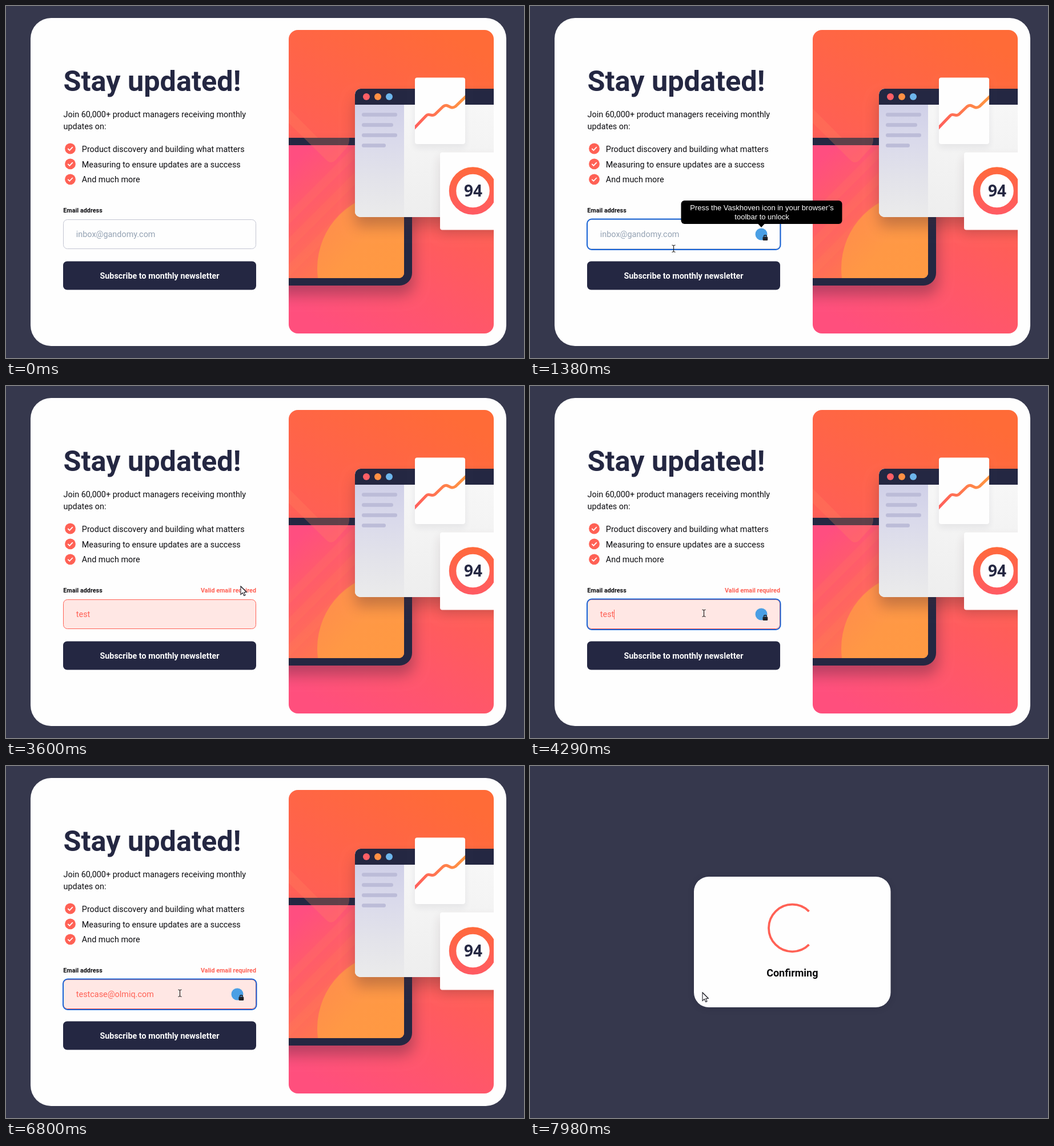
These frames come from a looping animation (907 px wide and 617 px high, 8000 ms). An HTML page with a canvas:

```html
<!DOCTYPE html>
<html lang="en">
<head>
<meta charset="utf-8">
<title>Stay updated</title>
<style>
html, body { margin: 0; width: 100%; height: 100%; overflow: hidden; background: #36384d; }
canvas { display: block; }
</style>
</head>
<body>
<canvas id="stage" width="907" height="617"></canvas>
<script>
const W = 907, H = 617, LOOP = 8000;
const NAVY = '#242742', TOMATO = '#ff6155', SLATE = '#36384d', WHITE = '#fefefe';
const ROBOTO = 'Roboto, sans-serif';
const stage = document.getElementById('stage').getContext('2d');
let g = stage;

// ---- drawing helpers ----
function box(x, y, w, h, r, fill, stroke, lw = 1) {
  g.beginPath();
  g.roundRect(x, y, w, h, r);
  if (fill) { g.fillStyle = fill; g.fill(); }
  if (stroke) { g.strokeStyle = stroke; g.lineWidth = lw; g.stroke(); }
}

function disc(x, y, r, fill) {
  g.beginPath();
  g.arc(x, y, r, 0, Math.PI * 2);
  g.fillStyle = fill;
  g.fill();
}

function text(str, x, y, font, color, align = 'left') {
  g.font = font;
  g.fillStyle = color;
  g.textAlign = align;
  g.fillText(str, x, y);
}

function poly(points, fill, stroke, lw = 1) {
  g.beginPath();
  points.forEach(([x, y]) => g.lineTo(x, y));
  if (fill) { g.closePath(); g.fillStyle = fill; g.fill(); }
  if (stroke) { g.strokeStyle = stroke; g.lineWidth = lw; g.stroke(); }
}

function gradient(x0, y0, x1, y1, ...colors) {
  const grad = g.createLinearGradient(x0, y0, x1, y1);
  colors.forEach((c, i) => grad.addColorStop(i / (colors.length - 1), c));
  return grad;
}

function shadowed(color, blur, dx, dy, draw) {
  g.save();
  g.shadowColor = color;
  g.shadowBlur = blur;
  g.shadowOffsetX = dx;
  g.shadowOffsetY = dy;
  draw();
  g.restore();
}

function clipped(x, y, w, h, r, draw) {
  g.save();
  g.beginPath();
  g.roundRect(x, y, w, h, r);
  g.clip();
  draw();
  g.restore();
}

// ---- illustration ----
function tablet() {
  shadowed('rgba(60,30,60,.36)', 24, 4, 17, () => box(440, 231, 271, 259, 22, NAVY));
  clipped(440, 244, 257, 233, 9, () => {
    box(440, 244, 257, 233, 0, gradient(505, 270, 625, 410, '#ff4e80', '#ff6064', '#ff7650'));
    for (let i = 0; i < 3; i++) {
      const x = 612 + i * 46;
      poly([[x, 244], [x + 22, 244], [x - 211, 477], [x - 233, 477]], 'rgba(255,150,80,.1)');
    }
    disc(678, 460, 133, gradient(560, 360, 690, 470, '#ff8d4c', '#ff9845', '#ff9942'));
  });
  g.beginPath();
  g.moveTo(495, 180);
  g.lineTo(546, 231);
  g.lineTo(601, 231);
  g.quadraticCurveTo(602, 242, 595, 250);
  g.lineTo(577, 270);
  g.quadraticCurveTo(569, 278, 561, 270);
  g.lineTo(495, 205);
  g.fillStyle = 'rgba(255,135,95,.27)';
  g.fill();
}

function appWindow() {
  shadowed('rgba(70,40,50,.3)', 24, 0, 17, () => box(611, 145, 300, 225, 10, '#f3f3f3'));
  clipped(611, 145, 300, 225, 10, () => {
    box(611, 145, 300, 225, 0, gradient(0, 173, 0, 370, '#f7f7f7', '#eeeeee'));
    box(611, 173, 86, 197, 0, gradient(0, 173, 0, 370, '#d0d0e8', '#dadaeb', '#e3e3ea', '#ebebeb'));
    box(611, 145, 300, 28, 0, NAVY);
  });
  ['#ff5f66', '#ff9145', '#6db6ec'].forEach((c, i) => disc(631 + i * 20, 159, 6, c));
  [62, 55, 62, 42].forEach((w, i) => box(623, 187.3 + i * 18, w, 6.4, 3.2, '#bcbcd8'));
}

function chartCard() {
  shadowed('rgba(40,40,70,.08)', 12, 0, 6, () => box(716, 125.5, 88, 116.5, 4, WHITE));
  clipped(716, 125.5, 88, 116.5, 4, () => {
    g.beginPath();
    g.moveTo(712, 217);
    g.lineTo(735, 193);
    g.bezierCurveTo(741, 186, 744, 195, 751, 190);
    g.lineTo(765, 176.5);
    g.bezierCurveTo(774, 169, 777, 183, 787, 176);
    g.lineTo(808, 156);
    g.strokeStyle = gradient(716, 0, 804, 0, '#ff5f5c', '#ff9640');
    g.lineWidth = 5;
    g.stroke();
  });
}

function scoreCard() {
  shadowed('rgba(70,40,50,.14)', 18, 0, 9, () => box(760, 256.5, 140, 136, 4, WHITE));
  g.beginPath();
  g.arc(817.5, 324, 35.5, 0, Math.PI * 2);
  g.strokeStyle = gradient(817, 283, 817, 366, '#ff693c', '#ff5a63');
  g.lineWidth = 12.5;
  g.stroke();
  text('94', 818, 333.5, 'bold 28px "Open Sans", sans-serif', NAVY, 'center');
}

function illustration() {
  clipped(495, 42, 359, 532, 16, () => {
    box(495, 42, 359, 532, 0, gradient(810, 70, 540, 550, '#ff6b37', '#ff5f55', '#ff4f7d'));
    tablet();
    appWindow();
    chartCard();
    scoreCard();
  });
}

// ---- form page without the field ----
function page() {
  box(0, 0, W, H, 0, SLATE);
  box(43, 21, 833, 575, 36, WHITE);
  text('Stay updated!', 100.5, 149, `bold 50.4px ${ROBOTO}`, NAVY);
  const body = `14.4px ${ROBOTO}`, ink = '#0c0c10';
  text('Join 60,000+ product managers receiving monthly', 100.5, 194.5, body, ink);
  text('updates on:', 100.5, 216, body, ink);
  ['Product discovery and building what matters',
   'Measuring to ensure updates are a success',
   'And much more'].forEach((line, i) => {
    const y = 250 + i * 26.9;
    disc(112.5, y, 9.4, TOMATO);
    poly([[108.3, y], [111.3, y + 3], [116.8, y - 2.8]], null, WHITE, 1.8);
    text(line, 132.8, y + 5.6, body, ink);
  });
  text('Email address', 100.3, 362, `bold 10.8px ${ROBOTO}`, ink);
  box(100, 447.5, 338, 50, 7, NAVY);
  text('Subscribe to monthly newsletter', 269, 478, `bold 14.4px ${ROBOTO}`, WHITE, 'center');
  illustration();
}

const backdrop = document.createElement('canvas');
backdrop.width = W;
backdrop.height = H;
g = backdrop.getContext('2d');
page();
g = stage;

// ---- timeline ----
const FOCUS = 880, TIP_END = 1740, SUBMIT = 3100, REFOCUS = 4160, CONFIRM = 7250;
const ADDRESS = 'testcase@olmiq.com';
const keys = [];
[[1720, 90, 4], [5040, 50, 4], [5450, 0, 1], [5740, 80, 2], [6070, 38, 7]].forEach(
  ([start, gap, count]) => {
    for (let i = 0; i < count; i++) keys.push(start + i * gap);
  });

// start, end, from, to, bend of the path
const moves = [
  [200, 960, [792, 592], [250, 408], [420, 440]],
  [1040, 1340, [250, 408], [251, 425], [250, 418]],
  [2660, 3060, [251, 425], [241, 464], [250, 448]],
  [3390, 3600, [241, 464], [411, 351], [340, 420]],
  [3850, 4250, [411, 351], [304, 398], [350, 372]]
];

function pointerAt(t) {
  let pos = null;
  for (const [start, end, a, b, c] of moves) {
    if (t < start) break;
    const u = Math.min(1, (t - start) / (end - start));
    const k = u * u * (3 - 2 * u), m = 1 - k;
    pos = a.map((v, i) => m * m * v + 2 * m * k * c[i] + k * k * b[i]);
  }
  return pos;
}

// ---- pointer shapes ----
function arrow() {
  poly([[0, 0], [0, 14.5], [3.4, 11.5], [5.7, 16.6], [8, 15.6], [5.8, 10.7], [10.3, 10.4]],
    '#fff', '#22222a', 1.1);
  poly([[10.3, 10.4], [0, 0]], null, '#22222a', 1.1);
}

function beam() {
  poly([[-3, -6], [0, -5], [3, -6]], null, '#222', 1.1);
  poly([[-3, 6.5], [0, 5.5], [3, 6.5]], null, '#222', 1.1);
  poly([[0, -5], [0, 5.5]], null, '#222', 1.2);
}

function hand() {
  box(-1.5, 0, 3.2, 12, 1.6, '#fff', '#222');
  box(-3.5, 8, 13, 10, 4, '#fff', '#222');
  for (let i = 0; i < 3; i++) box(1.6 + i * 2.7, 5.5 + i * 0.5, 2.7, 6, 1.3, '#fff', '#222', 0.8);
  box(-1, 8, 9.5, 8, 2, '#fff');
}

function pointer(t) {
  const pos = pointerAt(t);
  if (!pos || t < 240) return;
  const [x, y] = pos;
  const inside = (top, bottom) => x > 100 && x < 438 && y > top && y < bottom;
  let shape = arrow;
  if (t < CONFIRM) {
    if (inside(374, 426)) shape = beam;
    else if (inside(447, 498)) shape = hand;
  }
  g.save();
  if (shape === beam) g.translate(Math.round(x) + 0.5, Math.round(y));
  else if (t >= CONFIRM) g.translate(302, 397);
  else g.translate(x, y);
  shape();
  g.restore();
}

// ---- field ----
function lockIcon() {
  disc(405, 400, 10.5, '#4a9fe4');
  box(407.5, 404.5, 8.8, 6.6, 1.4, '#222226');
  g.beginPath();
  g.arc(411.9, 404.2, 2.5, Math.PI, 0);
  g.strokeStyle = '#222226';
  g.lineWidth = 1.5;
  g.stroke();
}

function tooltip() {
  box(264.5, 341, 282, 41, 6, '#000');
  poly([[399, 381.5], [411, 381.5], [405, 388]], '#000');
  const font = '13px "Liberation Sans", Arial, sans-serif';
  text('Press the Vaskhoven icon in your browser’s', 406, 358, font, '#fff', 'center');
  text('toolbar to unlock', 406, 374, font, '#fff', 'center');
}

function field(t) {
  const error = t >= SUBMIT;
  const focused = (t >= FOCUS && t < SUBMIT) || t >= REFOCUS;
  const pressed = keys.filter(k => k <= t);
  const value = ADDRESS.slice(0, pressed.length);
  const font = `14.4px ${ROBOTO}`;
  const ink = error ? TOMATO : NAVY;

  box(100.5, 374.5, 337, 51, 7, error ? '#ffe7e4' : WHITE, error ? TOMATO : '#c3c5d2');
  if (error) text('Valid email required', 438, 362, `bold 10.8px ${ROBOTO}`, TOMATO, 'right');
  if (value) text(value, 122.8, 405.3, font, ink);
  else text('inbox@gandomy.com', 122.8, 405.3, font, '#94a2b3');

  if (!focused) return;
  box(100, 373.5, 338.5, 53.5, 8, null, '#1763d6', 2);
  const since = t - Math.max(t >= REFOCUS ? REFOCUS : FOCUS, ...pressed);
  if (since % 1000 < 500) {
    g.font = font;
    const x = 122.8 + g.measureText(value).width;
    box(Math.round(x), 392, 1, 17, 0, ink);
  }
  lockIcon();
  if (t < TIP_END) tooltip();
}

// ---- confirming dialog ----
function confirming(t) {
  box(0, 0, W, H, 0, SLATE);
  shadowed('rgba(20,20,40,.15)', 12, 0, 2, () => box(287, 194, 344.5, 229, 26, WHITE));
  const step = Math.floor((t - CONFIRM) / 40.5);
  const gap = Math.PI / 2 + step * Math.PI / 12;
  g.beginPath();
  g.arc(459.3, 284, 41.3, gap + Math.PI / 4, gap + Math.PI * 7 / 4);
  g.strokeStyle = TOMATO;
  g.lineWidth = 3.8;
  g.stroke();
  text('Confirming', 459.3, 369, `bold 18px ${ROBOTO}`, '#0a0a0c', 'center');
  if (t < CONFIRM + 80) lockIcon();
}

function draw(t) {
  if (t < CONFIRM) {
    g.drawImage(backdrop, 0, 0);
    field(t);
  } else {
    confirming(t);
  }
  pointer(t);
}

const begin = performance.now();
function tick() {
  draw((performance.now() - begin) % LOOP);
  requestAnimationFrame(tick);
}
tick();
</script>
</body>
</html>
```
